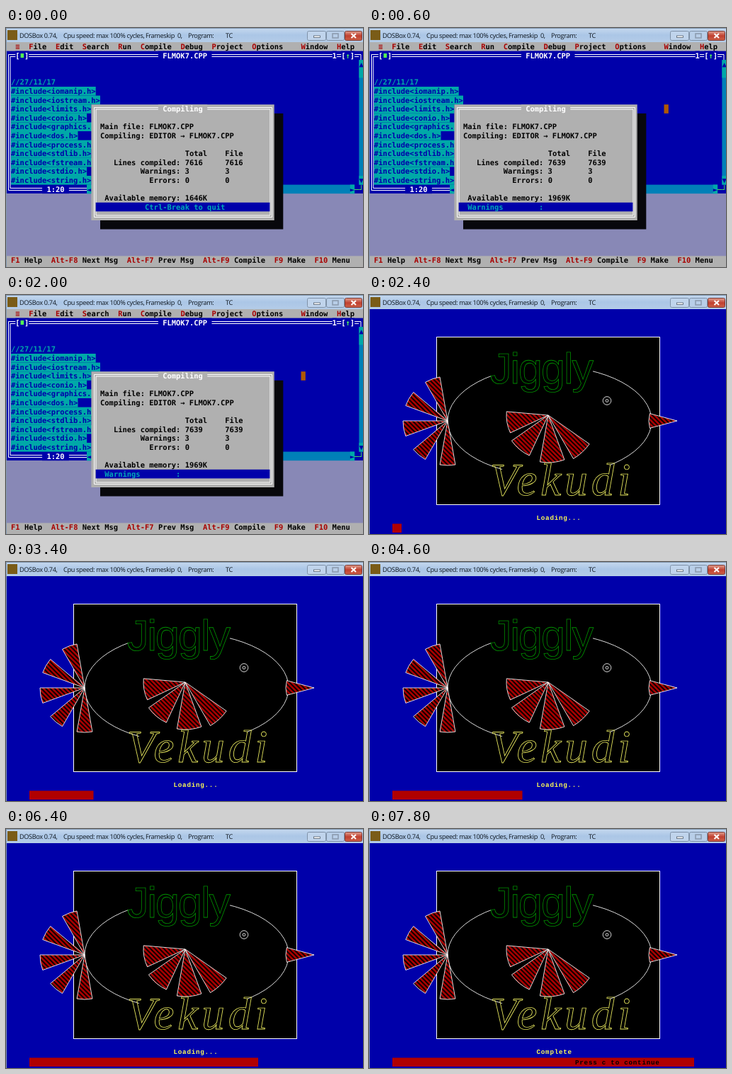
An HTML page that plays this animation: 504x338 px, repeating every 8 s.

```html
<!DOCTYPE html>
<html lang="en">
<head>
<meta charset="utf-8">
<title>Compile and load</title>
<style>
html, body { margin: 0; width: 100%; height: 100%; overflow: hidden; background: #0000aa; }
svg { display: block; width: 504px; height: 338px; }
text { white-space: pre; text-rendering: geometricPrecision; }
.dos { font: bold 10.46px "DejaVu Sans Mono", monospace; }
.caption { font: 9.2px "Open Sans", "Noto Sans", sans-serif; letter-spacing: -.37px; fill: #101820; }
.bgi { font: bold 9.2px "Liberation Mono", monospace; letter-spacing: .78px; }
.sans { font: 61px "Liberation Sans", sans-serif; letter-spacing: -2px; fill: none; stroke: #009000; stroke-width: .8; }
.italic { font: italic 65px "Liberation Serif", serif; letter-spacing: 5px; fill: none; stroke: #e4e45c; stroke-width: .9; }
.wire { fill: none; stroke: #fff; stroke-width: .85; }
.slice { fill: url(#hatch); stroke: #fff; stroke-width: .85; stroke-linejoin: round; }

.timed { animation: 8s step-end infinite; }
#ide { animation-name: ide; }
#splash { animation-name: splash; }
#busy { animation-name: busy; }
#done { animation-name: done; }
#prompt { animation-name: prompt; }
.loading { animation-name: loading; }
.complete { animation-name: complete; }
#bar { animation: bar 8s step-end infinite; }
@keyframes ide { 0% { opacity: 1 } 30%, 100% { opacity: 0 } }
@keyframes splash { 0% { opacity: 0 } 30%, 100% { opacity: 1 } }
@keyframes busy { 0% { opacity: 1 } 2.5%, 100% { opacity: 0 } }
@keyframes done { 0% { opacity: 0 } 2.5%, 100% { opacity: 1 } }
@keyframes prompt { 0%, 10%, 20% { opacity: 1 } 5%, 15%, 25%, 100% { opacity: 0 } }
@keyframes loading { 0% { opacity: 1 } 97.5%, 100% { opacity: 0 } }
@keyframes complete { 0% { opacity: 0 } 97.5%, 100% { opacity: 1 } }
@keyframes bar {
  0% { width: 13px }
  30% { width: 13px; animation-timing-function: steps(26) }
  95% { width: 416px }
  97.5%, 100% { width: 426px }
}
</style>
</head>
<body>
<svg viewBox="0 0 504 338">
  <defs>
    <linearGradient id="glass" x2="0" y2="1">
      <stop stop-color="#c6d9ef"/><stop offset=".5" stop-color="#abc6e6"/><stop offset="1" stop-color="#b4cce8"/>
    </linearGradient>
    <linearGradient id="close" x2="0" y2="1">
      <stop stop-color="#e0a090"/><stop offset=".5" stop-color="#c04030"/><stop offset="1" stop-color="#cc6048"/>
    </linearGradient>
    <pattern id="hatch" width="6.3" height="6.3" patternUnits="userSpaceOnUse">
      <rect width="6.3" height="6.3"/>
      <path d="M-6.3 -6.3L12.6 12.6M0 -6.3L12.6 6.3M-6.3 0L6.3 12.6" stroke="#b00000" stroke-width="2.6"/>
    </pattern>
    <clipPath id="beside-titles">
      <path d="M0 0H172V178H188V338H0ZM504 0H316V178H340V338H504Z"/>
    </clipPath>
  </defs>

  <g id="ide" class="timed dos"></g>

  <g id="splash" class="timed">
    <rect y="20" width="504" height="318" fill="#0000aa"/>
    <rect x="95.5" y="59.5" width="315" height="237" stroke="#fff"/>
    <ellipse class="wire" cx="255" cy="178" rx="144" ry="77.5" clip-path="url(#beside-titles)"/>
    <g id="slices"></g>
    <circle class="wire" cx="336" cy="149.5" r="5.8"/>
    <circle class="wire" cx="336" cy="149.5" r="1.9"/>
    <text class="sans" x="171" y="125">Jiggly</text>
    <text class="italic" x="171" y="283">Vekudi</text>
    <g class="bgi" fill="#fcfc54">
      <text class="timed loading" x="236.5" y="317.5">Loading...</text>
      <text class="timed complete" x="236.5" y="317.5">Complete</text>
    </g>
    <rect id="bar" x="33" y="323.5" width="13" height="12.5" fill="#b00000"/>
    <text class="bgi timed complete" x="291" y="333">Press c to continue</text>
  </g>

  <g class="caption">
    <rect width="504" height="20" fill="url(#glass)"/>
    <path d="M0 .5H504M.5 0V338" stroke="#8298b0"/>
    <rect x="2" y="3" width="14" height="14" fill="#7a5c18"/>
    <text x="19" y="14">DOSBox 0.74,</text>
    <text x="81" y="14">Cpu speed: max 100% cycles,</text>
    <text x="197" y="14">Frameskip  0,</text>
    <text x="257" y="14">Program:</text>
    <text x="310" y="14">TC</text>
    <g stroke="#8092a8">
      <rect x="425.5" y="4.5" width="26" height="13" rx="2" fill="#c0d4ec"/>
      <rect x="452.5" y="4.5" width="25" height="13" rx="2" fill="#b8cee8"/>
      <rect x="478.5" y="4.5" width="24" height="13" rx="2" fill="url(#close)" stroke="#803830"/>
    </g>
    <rect x="434.5" y="11" width="9" height="2.5" fill="#fff" stroke="#505c6c" stroke-width=".8"/>
    <rect x="461" y="8" width="8" height="6" fill="none" stroke="#8c9cb0" stroke-width="1.6"/>
    <path d="M487.5 8L494 14M494 8L487.5 14" stroke="#fff" stroke-width="2"/>
  </g>
</svg>
<script>
const NS = 'http://www.w3.org/2000/svg';
const CELL_W = 6.3, CELL_H = 12.6;
const BLUE = '#0000aa', CYAN = '#00a8a8', GRAY = '#b0b0b0', RED = '#a80000',
      BLACK = '#000', WHITE = '#fff', GREEN = '#54fc54';
const ide = document.getElementById('ide');
const colX = col => .7 + col * CELL_W;
const rowY = row => 20 + row * CELL_H;

function add(parent, tag, attrs, content = '') {
  const node = document.createElementNS(NS, tag);
  for (const key in attrs) node.setAttribute(key, attrs[key]);
  node.textContent = content;
  return parent.appendChild(node);
}
const box = (col, row, cols, rows, fill, parent = ide) => add(parent, 'rect',
  { x: colX(col), y: rowY(row), width: cols * CELL_W, height: rows * CELL_H, fill });
const write = (col, row, string, fill, parent = ide) =>
  add(parent, 'text', { x: colX(col), y: rowY(row) + 10, fill }, string);
const lines = d => add(ide, 'path', { d, fill: 'none', stroke: WHITE });
const layer = id => add(ide, 'g', { id, class: 'timed' });

function drawEditor() {
  add(ide, 'rect', { y: 20, width: 504, height: 318, fill: GRAY });
  add(ide, 'rect', { y: rowY(1), width: 504, height: 16 * CELL_H, fill: BLUE });
  add(ide, 'rect', { y: rowY(17), width: 504, height: 7 * CELL_H, fill: '#8888b6' });

  write(2, 0, '≡', RED);
  const menu = { File: 5, Edit: 11, Search: 17, Run: 25, Compile: 30, Debug: 39,
                 Project: 46, Options: 55, Window: 66, Help: 74 };
  for (const name in menu) {
    write(menu[name], 0, name[0], RED);
    write(menu[name] + 1, 0, name.slice(1), BLACK);
  }

  lines('M498 37.5H3.5V229.5H118M498 40.5H6V226.5H118M501 45V37.5H496');
  box(2, 1, 3, 1, BLUE);
  write(2, 1, '[ ]', WHITE);
  add(ide, 'rect', { x: colX(3) + 1, y: 36, width: 4.5, height: 6, fill: GREEN });
  box(34, 1, 12, 1, BLUE);
  write(35, 1, 'FLMOK7.CPP', WHITE);
  box(73, 1, 1, 1, BLUE);
  box(75, 1, 3, 1, BLUE);
  write(73, 1, '1 [ ]', WHITE);
  write(76, 1, '↑', GREEN);

  box(79, 2, 1, 14, '#0080b8');
  box(79, 2, 1, 2, CYAN);
  box(79, 15, 1, 1, CYAN);
  write(79, 2, '▲', BLUE);
  write(79, 15, '▼', BLUE);
  box(8, 16, 6, 1, BLUE);
  write(9, 16, '1:20', WHITE);
  box(18, 16, 60, 1, '#0080b8');
  box(18, 16, 1, 1, CYAN);
  box(77, 16, 1, 1, CYAN);
  write(18, 16, '◄', BLUE);
  write(77, 16, '►', BLUE);
  write(78, 16, '─┘', GREEN);

  write(1, 4, '//27/11/17', CYAN);
  'iomanip iostream limits conio graphics dos process stdlib fstream stdio string'
    .split(' ').forEach((name, i) => {
      const line = `#include<${name}.h>`;
      box(1, 5 + i, line.length, 1, CYAN);
      write(1, 5 + i, line, BLUE);
    });

  const keys = [['F1', 'Help', 1], ['Alt-F8', 'Next Msg', 10], ['Alt-F7', 'Prev Msg', 27],
                ['Alt-F9', 'Compile', 44], ['F9', 'Make', 60], ['F10', 'Menu', 69]];
  for (const [key, label, col] of keys) {
    write(col, 24, key, RED);
    write(col + key.length + 1, 24, label, BLACK);
  }
}

function drawDialog() {
  box(21, 8, 41, 13, '#08080c');
  box(19, 7, 41, 13, GRAY);
  lines('M124.5 112.5H375.5V267.5H124.5ZM127 115H373V265H127Z');
  box(34, 7, 11, 1, GRAY);
  write(35, 7, 'Compiling', WHITE);
  box(20, 18, 39, 1, BLUE);
  write(21, 9, 'Main file: FLMOK7.CPP', BLACK);
  write(21, 10, 'Compiling: EDITOR → FLMOK7.CPP', BLACK);
  write(40, 12, 'Total    File', BLACK);
  write(24, 13, 'Lines compiled:', BLACK);
  write(30, 14, 'Warnings: 3        3', BLACK);
  write(32, 15, 'Errors: 0        0', BLACK);
  write(22, 17, 'Available memory:', BLACK);
}

function drawCounts(parent, count, memory) {
  write(40, 13, `${count}     ${count}`, BLACK, parent);
  write(40, 17, memory, BLACK, parent);
}

// Angles in degrees, counterclockwise from the right.
function slice(cx, cy, r, from, to) {
  const point = deg => {
    const a = deg * Math.PI / 180;
    return `${cx + r * Math.cos(a)} ${cy - r * Math.sin(a)}`;
  };
  add(document.getElementById('slices'), 'path', {
    class: 'slice',
    d: `M${cx} ${cy}L${point(from)}A${r} ${r} 0 0 0 ${point(to)}Z`
  });
}

drawEditor();
drawDialog();

const busy = layer('busy');
drawCounts(busy, 7616, '1646K');
write(31, 18, 'Ctrl-Break to quit', '#00a8b8', busy);

const done = layer('done');
drawCounts(done, 7639, '1969K');
write(22, 18, 'Warnings        :', '#00a8b8', done);
box(66, 7, 1, 1, '#b05800', done);
write(40, 18, 'Press any key', '#00a8b8', add(done, 'g', { id: 'prompt', class: 'timed' }));

for (let deg = 100; deg <= 260; deg += 40) slice(111, 178, 63, deg, deg + 20);
slice(253, 170, 59, 175, 205);
slice(253, 170, 63, 215, 245);
slice(253, 170, 67, 260, 290);
slice(253, 170, 71, 300, 325);
slice(435, 178, 40, 165, 195);
</script>
</body>
</html>
```
